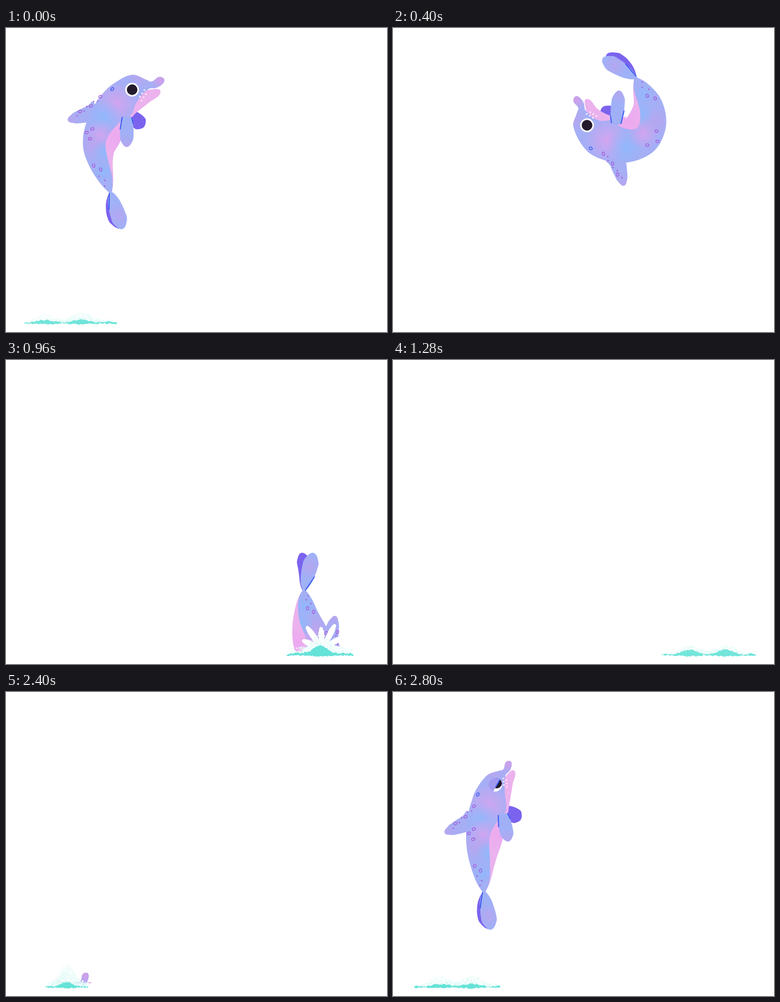
An HTML page with a canvas that plays this animation: 720 by 574 pixels, repeating every 2.88 s.

```html
<!DOCTYPE html>
<html lang="en">
<head>
<meta charset="utf-8">
<title>Leaping dolphin</title>
<style>
html, body { margin: 0; width: 100%; height: 100%; overflow: hidden; background: #fff; }
canvas { display: block; }
</style>
</head>
<body>
<canvas id="stage" width="720" height="574"></canvas>
<script>
const ctx = document.getElementById('stage').getContext('2d');
const TICK = 80, TICKS = 36, WATER = 550, RAD = Math.PI / 180;
const BLUE = '#3a5cf2', DARK = '#7b63ee', TEAL = '#66e3d8';
const PINK = '222,162,238', SKY = '140,186,253', LILAC = '186,164,238';

const mix = (a, b, k) => a + (b - a) * k;
const mixPt = (a, b, k) => [mix(a[0], b[0], k), mix(a[1], b[1], k)];
const angle = (a, b) => Math.atan2(b[1] - a[1], b[0] - a[0]);
const dist = (a, b) => Math.hypot(b[0] - a[0], b[1] - a[1]);
const move = ([x, y], a, dx, dy = 0) =>
  [x + dx * Math.cos(a) - dy * Math.sin(a), y + dx * Math.sin(a) + dy * Math.cos(a)];
const count = (n, f) => Array.from({ length: n }, (_, i) => f(i));

// Spine from tail root to snout tip. Fin settings: dorsal place and angle,
// flipper angle and length, fluke angle and spread, all relative to the spine.
const rise = { spine: [[172,378], [169,315], [174,264], [181,225], [195,175], [220,131]],
  girth: 1, lid: 3, dorsal: [2.4, -123], flipper: [155, 52], fluke: [172, 3] };
const arch = { spine: [[198,311], [177,243], [183,200], [206,153], [240,118], [297,96]],
  girth: 1, lid: -14, dorsal: [2.6, -134], flipper: [146, 56], fluke: [179, 3] };
const flip = { spine: [[458,94], [482,150], [467,200], [416,211], [368,182], [344,131]],
  girth: 1.15, lid: -14, dorsal: [2.85, -108], flipper: [85, 62], fluke: [144, 8] };
const dive = { spine: [[517,197], [560,247], [576,288], [580,333], [574,382], [545,432]],
  girth: 1, lid: -4, dorsal: [2.25, -131], flipper: [123, 40], fluke: [135, 26] };
const plunge = { spine: [[563,434], [568,488], [578,530], [592,580], [590,635], [570,685]],
  girth: 1, lid: -4, dorsal: [2.35, -148], flipper: [123, 40], fluke: [200, -18] };

const poses = [];
function addPose(t, { spine, girth, lid, dorsal, flipper, fluke }, dx = 0, dy = 0) {
  let near = poses.length ? poses[poses.length - 1].shape[0] : -1.6;
  const turns = count(5, i => {
    const a = angle(spine[i], spine[i + 1]);
    return near = a + 2 * Math.PI * Math.round((near - a) / (2 * Math.PI));
  });
  const [x, y] = mixPt(spine[2], spine[3], .5);
  const shape = [...turns, ...count(5, i => dist(spine[i], spine[i + 1])),
    girth, lid, ...dorsal, ...flipper, ...fluke];
  poses.push({ t, x: x + dx, y: y + dy, shape });
}
addPose(-6, rise, -68, 400);
addPose(-1, rise);
addPose(0, arch);
addPose(5, flip);
addPose(9, dive);
addPose(12, plunge);
addPose(15, plunge, 12, 240);

function slope(key, i) {
  const v = j => (poses[j + 1][key] - poses[j][key]) / (poses[j + 1].t - poses[j].t);
  if (i == 0) return v(0);
  if (i == poses.length - 1) return v(i - 1);
  const h0 = poses[i].t - poses[i - 1].t, h1 = poses[i + 1].t - poses[i].t;
  return (v(i - 1) * h1 + v(i) * h0) / (h0 + h1);
}

function glide(key, i, k) {
  const a = poses[i], b = poses[i + 1], h = b.t - a.t, k2 = k * k, k3 = k2 * k;
  return (2 * k3 - 3 * k2 + 1) * a[key] + (k3 - 2 * k2 + k) * h * slope(key, i)
    + (3 * k2 - 2 * k3) * b[key] + (k3 - k2) * h * slope(key, i + 1);
}

function poseAt(t) {
  let i = 0;
  while (i < poses.length - 2 && t >= poses[i + 1].t) i++;
  const a = poses[i], b = poses[i + 1], k = (t - a.t) / (b.t - a.t);
  const shape = a.shape.map((v, j) => mix(v, b.shape[j], k));
  const lift = t > 0 && t < 5 ? 45 * Math.sin(Math.PI * t / 5) : 0;
  const spine = [[0, 0]];
  for (let j = 0; j < 5; j++) spine.push(move(spine[j], shape[j], shape[j + 5]));
  const mid = mixPt(spine[2], spine[3], .5);
  const dx = glide('x', i, k) - mid[0], dy = glide('y', i, k) - lift - mid[1];
  return { spine: spine.map(p => [p[0] + dx, p[1] + dy]), shape };
}

// Catmull-Rom point on the spine.
function along(pts, s) {
  const i = Math.max(0, Math.min(pts.length - 2, Math.floor(s))), k = s - i;
  const p = j => pts[Math.max(0, Math.min(pts.length - 1, i + j))];
  return [0, 1].map(c => {
    const [a, b, d, e] = [p(-1)[c], p(0)[c], p(1)[c], p(2)[c]];
    return b + .5 * k * (d - a + k * (2 * a - 5 * b + 4 * d - e + k * (3 * (b - d) + e - a)));
  });
}

function smooth(pts) {
  const n = pts.length, path = new Path2D();
  const dir = i => angle(pts[(i + n - 1) % n], pts[(i + 1) % n]);
  path.moveTo(...pts[0]);
  pts.forEach((p, i) => {
    const q = pts[(i + 1) % n], r = dist(p, q) * .34;
    path.bezierCurveTo(...move(p, dir(i), r), ...move(q, dir((i + 1) % n), -r), ...q);
  });
  path.closePath();
  return path;
}

// Rounded blade whose half width runs from w0 at the root towards w1.
function blade(root, dir, len, w0, w1, bend = 0) {
  const side = sign => count(6, i => {
    const k = i / 5, half = mix(w0, w1, Math.sqrt(k)) * Math.sqrt(1 - k ** 4);
    return move(root, dir, len * k, sign * half + bend * Math.sin(Math.PI * k));
  });
  return [...side(-1), ...side(1).reverse().slice(1)];
}

function fill(path, color) {
  ctx.fillStyle = color;
  ctx.fill(path);
}

// Flat fill with soft clouds of [point, radius, rgb].
function paint(path, color, ...clouds) {
  fill(path, color);
  ctx.save();
  ctx.clip(path);
  for (const [[x, y], r, rgb] of clouds) {
    const g = ctx.createRadialGradient(x, y, 0, x, y, r);
    g.addColorStop(0, `rgba(${rgb},.8)`);
    g.addColorStop(1, `rgba(${rgb},0)`);
    ctx.fillStyle = g;
    ctx.fillRect(x - r, y - r, 2 * r, 2 * r);
  }
  ctx.restore();
}

function disc([x, y], r, color) {
  ctx.beginPath();
  ctx.arc(x, y, r, 0, 7);
  ctx.fillStyle = color;
  ctx.fill();
}

function line(a, b) {
  ctx.beginPath();
  ctx.moveTo(...a);
  ctx.lineTo(...b);
  ctx.strokeStyle = BLUE;
  ctx.lineWidth = 2;
  ctx.lineCap = 'round';
  ctx.stroke();
}

function spot(p, ring, tilt, color = '#a45fdc') {
  if (!ring) return disc(p, 1.4, color);
  ctx.beginPath();
  ctx.ellipse(...p, 3.2, 2.4, tilt, 0, 7);
  ctx.strokeStyle = color;
  ctx.lineWidth = 1.4;
  ctx.stroke();
}

function drawEye(c, heading, lid) {
  const drop = (lid + 14) / 14;
  ctx.save();
  ctx.translate(...c);
  ctx.rotate(heading);
  disc([0, 0], 13, '#fff');
  ctx.beginPath();
  ctx.arc(0, 0, 13, 0, 7);
  ctx.clip();
  disc([4 * Math.min(drop, 1), Math.min(drop, 1)], 10, '#231a2c');
  if (drop > 0) {
    ctx.fillStyle = '#a19af0';
    ctx.fillRect(-14, -14, 28, lid + 14);
    line([-3, lid], [12, lid]);
  }
  ctx.restore();
}

function drawDolphin(t) {
  const { spine, shape } = poseAt(t);
  const [girth, lid, finAt, finTurn, flipTurn, flipLen, flukeTurn, spread] = shape.slice(10);
  const course = s => angle(along(spine, s - .05), along(spine, s + .05));
  const half = s => girth * (2 + 35 * (1 - Math.abs(1 - s / 2.6) ** 2.4));
  // v runs across the body: -1 back, 1 belly.
  const at = (s, v) => move(along(spine, s), course(s), 0, v * half(s));
  const edge = (from, to, v) => count(10, i => {
    const s = mix(from, to, i / 9);
    return at(s, v(s));
  });
  const inner = s => Math.min(1, .28 + .65 * (Math.abs(s - 1.8) / 1.5) ** 1.5);
  const heading = shape[4], size = shape[9] / 60;
  const head = (x, y) => move(spine[4], heading, x * size, y * size);

  ctx.save();
  ctx.beginPath();
  ctx.rect(0, 0, 720, WATER);
  ctx.clip();

  const tail = shape[0] + flukeTurn * RAD;
  fill(smooth(blade(spine[0], tail + spread * RAD, 70, 3, 18, 5)), DARK);
  const flipDir = course(3) + flipTurn * RAD;
  fill(smooth(blade(at(3.2, .85), flipDir - .8, 34, 8, 17)), DARK);

  const finDir = course(finAt) + finTurn * RAD, finBase = at(finAt, -1);
  const fin = blade(at(finAt, -.75), finDir, 56, 20, 11);
  paint(smooth(fin), '#a6aef4', [fin[5], 26, LILAC]);

  const belly = [head(47, 20), head(18, 32), ...edge(3.3, 0, () => 1),
    ...edge(0, 3.2, () => 0), head(0, 5), head(27, 9)];
  paint(smooth(belly), '#ebb2ed', [at(2, .8), 35, '238,166,240']);

  const back = [...edge(0, 3.6, () => -1), head(8, -28), head(30, -10), head(38, -3),
    head(55, -6), head(61, 4), head(44, 11), head(27, 8), head(-2, 23), ...edge(3.2, 0, inner)];
  paint(smooth(back), '#a4aff5', [at(3.2, -.1), 42, PINK], [at(2.6, -.3), 34, SKY],
    [at(1.9, -.1), 30, PINK], [at(1.4, -.5), 30, LILAC], [at(1.2, .4), 24, SKY],
    [at(.6, 0), 20, SKY], [head(20, -20), 26, LILAC], [head(55, 0), 20, '222,154,230']);

  for (let i = 0; i < 3; i++) spot(at(2.05 - i * .2, -.85 + .25 * (i != 1)), true, course(2) + 1);
  for (let i = 0; i < 5; i++) spot(at(.8 - i * .13, i % 2 ? -.2 : -.65), i < 2, course(.6));
  for (let i = 0; i < 8; i++) {
    const x = 30 - i * 7.5;
    spot(move(finBase, finDir, x, 7 - x * .35 + i % 2 * 4), i % 3 == 1, finDir);
  }
  spot(at(3.5, -.8), true, course(3.5), BLUE);

  drawEye(head(-1, -2), heading, lid);
  for (let i = 0; i < 6; i++) {
    const row = i >> 1;
    disc(head(20 - 6 * row, 7 + 4 * row + i % 2 * 8), 1.5, '#fdf4ff');
  }

  const flipper = blade(at(3, .75), flipDir, flipLen, 9, 15);
  paint(smooth(flipper), '#a0b0f6', [flipper[5], 26, LILAC]);
  line(flipper[10], flipper[8]);
  line(flipper[0], flipper[1]);
  const fluke = blade(spine[0], tail, 72, 3, 19);
  paint(smooth(fluke), '#9fb1f7', [move(spine[0], tail, 45), 24, LILAC]);
  line(fluke[10], fluke[8]);
  ctx.restore();
}

function random(seed) {
  return () => {
    seed = seed + 0x6D2B79F5 | 0;
    let n = Math.imul(seed ^ seed >>> 15, 1 | seed);
    n ^= n + Math.imul(n ^ n >>> 7, 61 | n);
    return ((n ^ n >>> 14) >>> 0) / 4294967296;
  };
}

function drawFoam(age) {
  const reach = [.6, 1, .85, .4][age];
  for (let i = 0; i < 5; i++) {
    const len = (42 + i % 2 * 11) * reach;
    fill(smooth(blade([598, 546], (-156 + 31 * i) * RAD, len, 2, 7)), '#fff');
  }
  ctx.beginPath();
  ctx.ellipse(600, 551, 40, 15 * reach, 0, Math.PI, 0);
  ctx.fillStyle = '#fff';
  ctx.fill();
}

const leftSplash = { x: 115, drift: 14, from: 42, to: 121, crest: 5, life: 11 };
const rightSplash = { x: 592, drift: 9, from: 55, to: 115, crest: 15, life: 9 };

// A mound that spreads into low waves and thins out.
function drawSplash({ x, drift, from, to, crest, life }, age) {
  if (age < 0 || age >= life) return;
  const k = age / life, rnd = random(x + age * 97);
  const cx = x + drift * k, w = mix(from, to, k ** .75), mist = 44 * (1 - k);
  const density = Math.min(1, 2 * (1 - k));
  const swell = u => mix(Math.exp(-7 * u * u), .5 + .5 * Math.sin(u * 8 + age), Math.min(1, 2 * k));
  const tints = ['#e6fbf8', '#d0f6f1', '#a9eee6'];

  for (let n = 0; n < 800 * density; n++) {
    const u = rnd() + rnd() - 1, up = rnd() ** 1.5, size = 1 + rnd();
    ctx.fillStyle = tints[Math.floor((1 - up) * rnd() * 3)];
    ctx.fillRect(cx + u * w, 556 - up * mist * (.35 + .65 * swell(u)) * (1 - u * u * .5), size, size);
  }

  const ragged = (base, rise, noise) => count(60, i => {
    const u = i / 29.5 - 1, rim = Math.sqrt(1 - u * u);
    return [cx + u * w * .95, base - rim * rise * swell(u) + (rnd() - .5) * noise];
  });
  const height = crest * (1 - k) + 3;
  ctx.globalAlpha = density;
  ctx.beginPath();
  for (const p of [...ragged(556, height, 3), ...ragged(558, -1.5, 2.5).reverse()]) ctx.lineTo(...p);
  ctx.fillStyle = TEAL;
  ctx.fill();
  ctx.globalAlpha = 1;
}

function draw(tick) {
  const t = tick >= 30 ? tick - TICKS : tick;
  ctx.fillStyle = '#fff';
  ctx.fillRect(0, 0, 720, 574);
  if (t < 15) drawDolphin(t);
  if (t >= 11 && t < 15) drawFoam(t - 11);
  drawSplash(leftSplash, t + 6);
  drawSplash(rightSplash, t - 11);
}

const start = performance.now();
let shown = -1;
function loop() {
  const tick = Math.floor((performance.now() - start) / TICK) % TICKS;
  if (tick !== shown) draw(shown = tick);
  requestAnimationFrame(loop);
}
loop();
</script>
</body>
</html>
```
